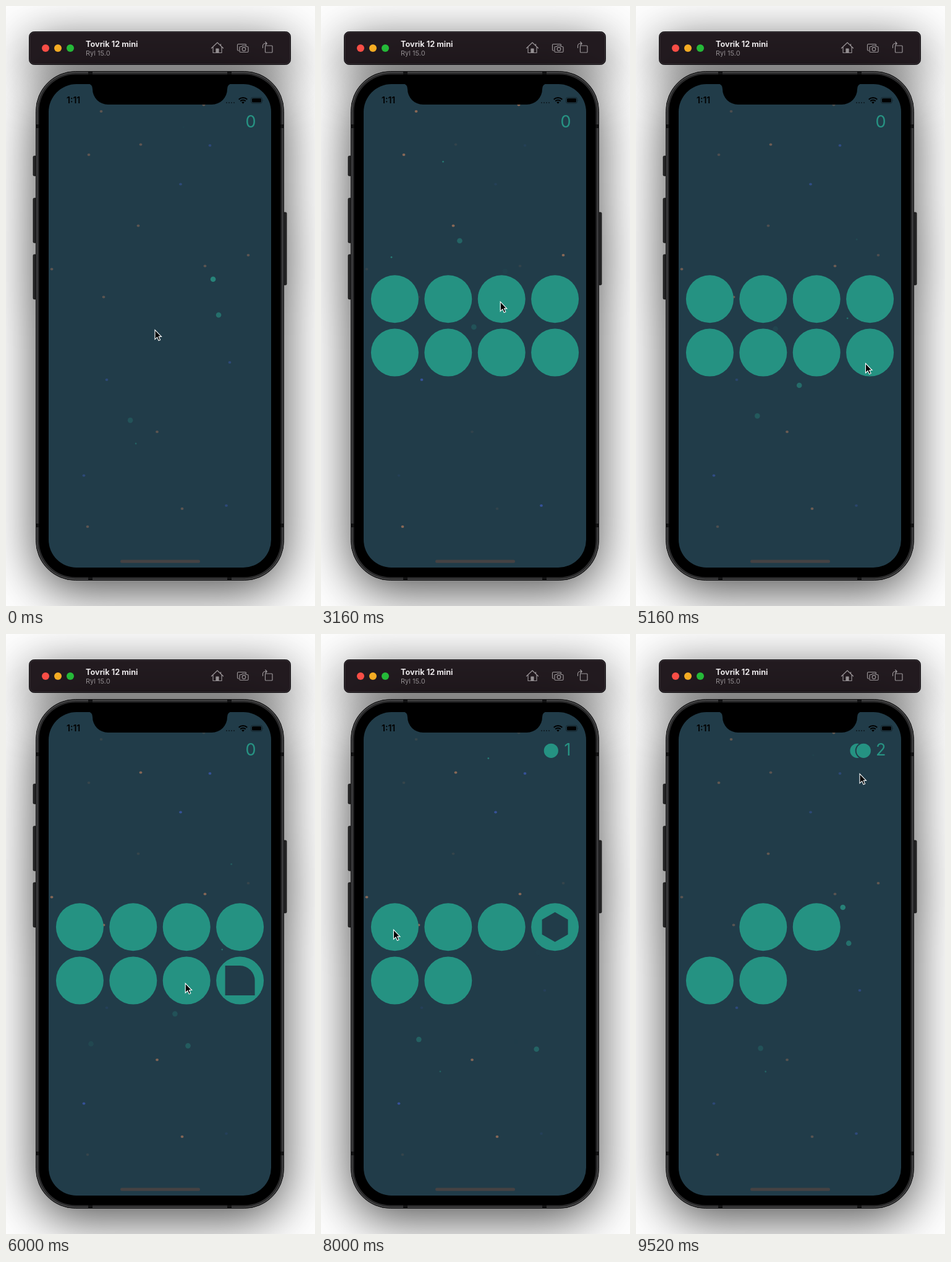
An HTML page that plays this animation: 500x968 px, repeating every 9560 ms.

```html
<!DOCTYPE html>
<html lang="en">
<head>
<meta charset="utf-8">
<title>Memory game</title>
<style>
  html, body { margin: 0; width: 100%; height: 100%; overflow: hidden; background: #fff; }
  svg { display: block; width: 500px; height: 968px; }
  text { font-family: Inter, Roboto, sans-serif; }
  .window { filter: drop-shadow(0 17px 40px rgba(0, 0, 0, .7)); }
  .icon { fill: none; stroke: #a09b9e; stroke-width: 1.2; stroke-linejoin: round; stroke-linecap: round; }
</style>
</head>
<body>
<svg viewBox="0 0 500 968">
  <defs>
    <clipPath id="screen"><rect x="69" y="126" width="360" height="780" rx="45"/></clipPath>
  </defs>

  <g class="window">
    <rect x="37.5" y="41.5" width="423" height="53" rx="8" fill="#231b20" stroke="#09070a"/>
    <rect x="38.5" y="42.5" width="421" height="51" rx="7" fill="none" stroke="#4b4549" stroke-width=".7"/>
  </g>
  <circle cx="64" cy="68" r="6" fill="#fe5048"/>
  <circle cx="84" cy="68" r="6" fill="#fdb225"/>
  <circle cx="104" cy="68" r="6" fill="#27c23b"/>
  <text x="129" y="66" font-size="12.7" font-weight="700" fill="#f3f0f2">Tovrik 12 mini</text>
  <text x="129" y="80" font-size="11" fill="#9d989b">Ryl 15.0</text>
  <g class="icon">
    <path d="M332.5 68L342 59l9.500 9M335 66v9.500h14V66M347.500 61.500v2.500"/>
    <path d="M340 75.500v-6.500h4v6.500z" fill="#a09b9e"/>
    <path d="M376.500 72H376a1.500 1.500 0 0 1-1.500-1.500V63a1.500 1.500 0 0 1 1.500-1.500h11a1.500 1.500 0 0 1 1.500 1.500v.5"/>
    <path d="M379.500 65.500h2l1-1.500h5l1 1.500h2a1.500 1.500 0 0 1 1.500 1.500v6a1.500 1.500 0 0 1-1.500 1.500h-11a1.500 1.500 0 0 1-1.500-1.500v-6a1.500 1.500 0 0 1 1.500-1.500z"/>
    <circle cx="385" cy="69.500" r="2.800"/>
    <rect x="419.500" y="64" width="11.500" height="11" rx="1"/>
    <path d="M415.500 67.500v-3a4 4 0 0 1 4-4h2.500M419.800 58l2.400 2.500-2.400 2.500"/>
  </g>

  <g class="window">
    <g fill="#242425" stroke="#0b0b0c" stroke-width=".8">
      <rect x="44" y="242" width="7" height="32" rx="1.500"/>
      <rect x="44" y="310" width="7" height="72" rx="1.500"/>
      <rect x="44" y="401" width="7" height="72" rx="1.500"/>
      <rect x="447" y="333" width="7" height="117" rx="1.500"/>
    </g>
    <rect x="48.500" y="105.500" width="401" height="821" rx="64" fill="#29292a" stroke="#0e0e0f"/>
    <rect x="50" y="107" width="398" height="818" rx="62.500" fill="none" stroke="#59595a"/>
  </g>
  <g fill="#121213">
    <path d="M133 105h7v6h-7zM358 105h7v6h-7zM133 921h7v6h-7zM358 921h7v6h-7z"/>
    <path d="M48 191h6v6h-6zM444 191h6v6h-6zM48 835h6v6h-6zM444 835h6v6h-6z"/>
  </g>
  <rect x="53.500" y="110.500" width="391" height="811" rx="59"/>

  <g clip-path="url(#screen)">
    <rect x="69" y="126" width="360" height="780" fill="#213c49"/>
    <g id="sky"></g>
    <g id="cards"></g>
    <g id="coins" fill="#259282" stroke="#213c49" stroke-width="2"></g>
    <text id="score" x="404.500" y="196.300" font-size="27" font-weight="400" text-anchor="end" fill="#279383">0</text>
    <text x="98" y="157" font-size="14" font-weight="600">1:11</text>
    <path d="M356 156h14" fill="none" stroke="#122129" stroke-width="1.800" stroke-dasharray="2 2"/>
    <path d="M376.700 150.700a10 10 0 0 1 13.600 0M379.300 153.500a6 6 0 0 1 8.400 0" fill="none" stroke="#000" stroke-width="2"/>
    <path d="M381.300 155.300a3.200 3.200 0 0 1 4.400 0l-2.200 2.500z"/>
    <rect x="396.500" y="147.500" width="18" height="9.500" rx="2.800" fill="none" stroke="#15252d"/>
    <rect x="398" y="149" width="15" height="6.500" rx="1.500"/>
    <path d="M415.700 150.700q1.500 1.500 0 3z" fill="#15252d"/>
    <rect x="185" y="893.500" width="129" height="5" rx="2.500" fill="#454243"/>
  </g>
  <path d="M132 125.500q8 0 8 8.500a25 25 0 0 0 25 25h168a25 25 0 0 0 25-25q0-8.500 8-8.500z"/>

  <path id="pointer" d="M0 0V15.300L3.600 11.900 6 17.300 8.600 16.200 6.300 10.900H10.500z" stroke="#fff" stroke-width="1.100"/>
</svg>
<script>
const LOOP = 9560, GREEN = '#259282', BACK = '#213c49';
const byId = id => document.getElementById(id);
const clamp = v => Math.min(1, Math.max(0, v));
const mix = (a, b, u) => a + (b - a) * u;
const ease = u => u * u * (3 - 2 * u);
const progress = (t, from, length) => ease(clamp((t - from) / length));

function add(parent, tag, attrs = {}) {
  const el = document.createElementNS('http://www.w3.org/2000/svg', tag);
  set(el, attrs);
  return parent.appendChild(el);
}
function set(el, attrs) {
  for (const name in attrs) el.setAttribute(name, attrs[name]);
}

// Twinkling stars: two groups in opposite phase
const ORANGE = '#d68a62', BLUE = '#4763d6';
const makeStars = (points, fill, phase) => points.map(([cx, cy]) =>
  ({ phase, el: add(byId('sky'), 'ellipse', { cx, cy, rx: 2.4, ry: 2.1, fill }) }));
const stars = [
  ...makeStars([[154, 170], [134, 240], [214, 354.5], [392, 402], [132, 840], [320, 159.5]], ORANGE, 1),
  ...makeStars([[163, 603], [356.5, 806], [362, 575]], BLUE, 1),
  ...makeStars([[218, 223.5], [74, 424.5], [322, 419.5], [158, 469.5], [244.5, 687], [285, 811]], ORANGE, -1),
  ...makeStars([[330, 225], [282.5, 287.5], [126, 757.5]], BLUE, -1)
];

// Sparks are born at even intervals, drift slowly and fade in and out
const SPARKS = 18, SPARK_LIFE = 2700;
let seed = 11;
const random = (min, max) => {
  seed = seed * 16807 % 2147483647;
  return mix(min, max, seed / 2147483647);
};
const sparks = Array.from({ length: SPARKS }, (_, i) => ({
  birth: i * LOOP / SPARKS,
  x: random(90, 365),
  y: random(190, 780),
  angle: random(0, 2 * Math.PI),
  peak: random(.3, .75),
  el: add(byId('sky'), 'circle', { r: i % 5 < 3 ? 4.3 : 1.4, fill: '#2aa18e' })
}));

const SHAPES = {
  hexagon: 'M0-24 21-12V12L0 24-21 12V-12z',
  diamond: 'M0-24 16.300 0 0 24-16.300 0z',
  leaf: 'M-24-24H0A24 24 0 0 1 24 0V24H-24z',
  triangle: 'M0-22 24 20H-24z'
};
const DECK = ['hexagon', 'triangle', 'diamond', 'hexagon', 'diamond', 'triangle', 'leaf', 'leaf'];
const cards = DECK.map((shape, i) => {
  const el = add(byId('cards'), 'g');
  add(el, 'circle', { r: 38.5, fill: GREEN });
  const hole = add(el, 'path', { d: SHAPES[shape], fill: BACK });
  return { shape, el, hole, x: 119.4 + 86.4 * (i % 4), y: i < 4 ? 472.7 : 559.1, open: [], leave: Infinity };
});

// Clicks (time, slot) come in pairs: a match leaves for the score, a miss closes again
const CLICKS = [[1100, 0], [1620, 1], [3220, 2], [3700, 3], [5500, 7], [6080, 6], [7500, 3], [8060, 0]];
const DELAY = 600, FLIP = 160, SWELL = 180, FLIGHT = 600;
const matches = [];
for (let i = 0; i < CLICKS.length; i += 2) {
  const turn = CLICKS.slice(i, i + 2);
  const end = turn[1][0] + DELAY;
  const match = DECK[turn[0][1]] === DECK[turn[1][1]];
  if (match) matches.push(end);
  for (const [time, slot] of turn) {
    cards[slot].open.push([time, match ? LOOP : end]);
    if (match) cards[slot].leave = end;
  }
}
const coins = matches.map(() => add(byId('coins'), 'circle', { cy: 188.3, r: 12.6 }));

// The pointer settles on each card around its click
const stops = [[0, 240, 521], [300, 240, 521], [4280, 332, 673], [9480, 361, 224], [LOOP, 361, 224]];
for (const [time, slot] of CLICKS) {
  const { x, y } = cards[slot];
  stops.push([time - 100, x - 3, y + 3], [time + 200, x - 3, y + 3]);
}
stops.sort((a, b) => a[0] - b[0]);

function drawCard({ el, hole, x, y, open, leave }, i, t) {
  const lift = t - leave;
  const go = progress(lift, SWELL, FLIGHT - SWELL);
  const swell = mix(1, 1.32, progress(lift, 0, SWELL));
  const scale = progress(t, 120 + i * 25, 280) * mix(swell, .3, go);
  const shown = Math.max(0, ...open.map(([from, to]) => progress(t, from, FLIP) - progress(t, to, FLIP)));
  set(el, {
    transform: `translate(${mix(x, 370, go)} ${mix(y, 188.3, go)}) scale(${scale})`,
    visibility: lift >= FLIGHT || !scale ? 'hidden' : 'visible'
  });
  set(hole, { transform: `scale(${shown})` });
}

function drawSky(t) {
  const wave = Math.sin(2 * Math.PI * t / 9400);
  for (const { el, phase } of stars) set(el, { opacity: .33 + .28 * phase * wave });
  for (const { el, birth, x, y, angle, peak } of sparks) {
    const age = (t - birth + LOOP) % LOOP;
    const drift = age * .011;
    set(el, {
      cx: x + drift * Math.cos(angle),
      cy: y + drift * Math.sin(angle),
      opacity: peak * Math.sin(Math.PI * clamp(age / SPARK_LIFE))
    });
  }
}

function drawScore(t) {
  const score = matches.filter(end => t >= end + FLIGHT).length;
  byId('score').textContent = score;
  coins.forEach((coin, i) => set(coin, {
    cx: score < 2 ? 372.3 : 358 + 10.3 * i,
    visibility: i < score ? 'visible' : 'hidden'
  }));
}

function drawPointer(t) {
  const next = stops.findIndex(stop => stop[0] > t);
  const [t0, x0, y0] = stops[next - 1], [t1, x1, y1] = stops[next];
  const u = progress(t, t0, t1 - t0);
  set(byId('pointer'), { transform: `translate(${mix(x0, x1, u) + 1} ${mix(y0, y1, u) + 1.5})` });
}

const start = performance.now();
function tick() {
  const t = (performance.now() - start) % LOOP;
  drawSky(t);
  cards.forEach((card, i) => drawCard(card, i, t));
  drawScore(t);
  drawPointer(t);
  requestAnimationFrame(tick);
}
tick();
</script>
</body>
</html>
```
